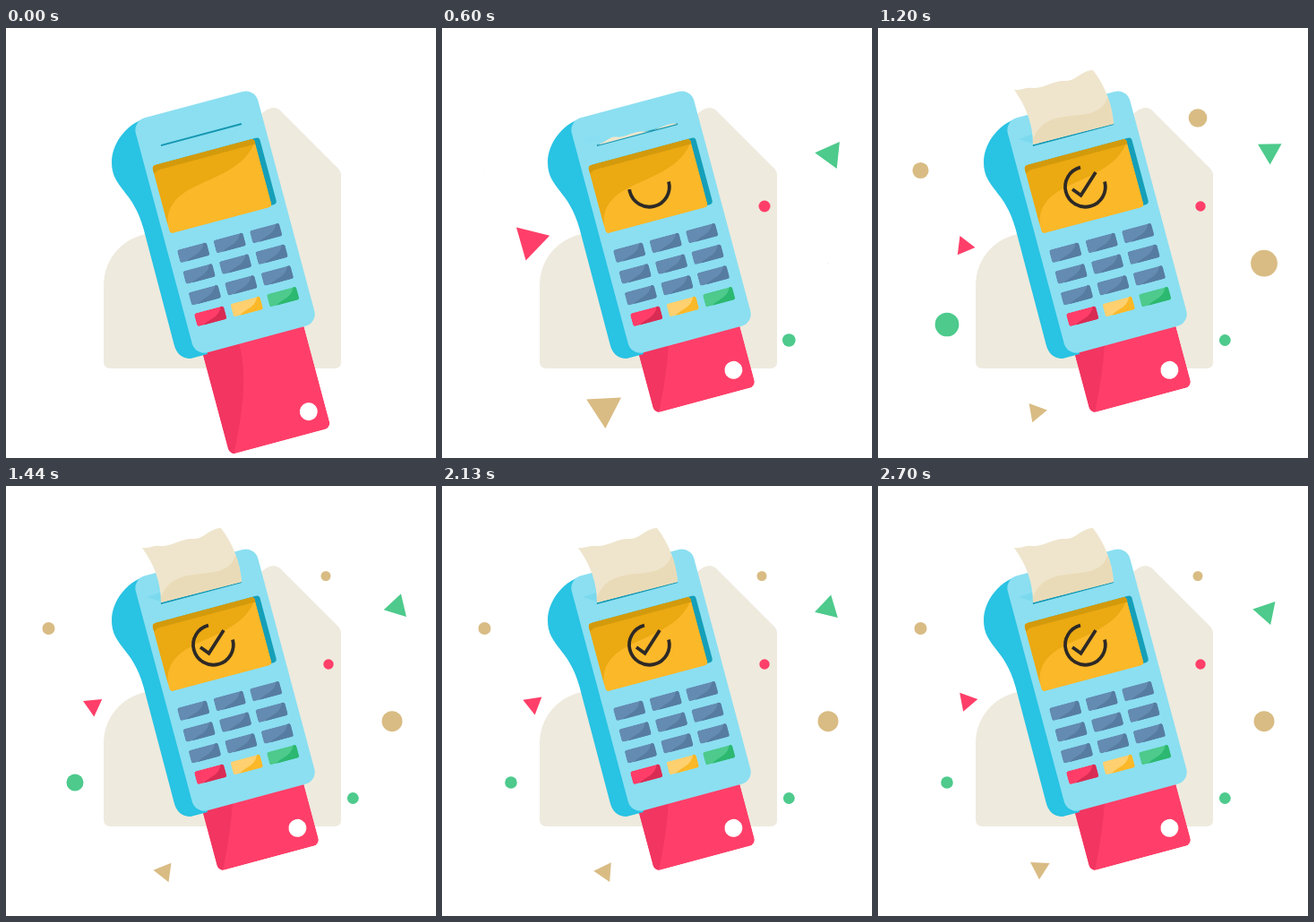
An HTML page with a canvas that plays this animation: 480x480 px, repeating every 2.73 s.

```html
<!DOCTYPE html>
<html lang="en">
<head>
<meta charset="utf-8">
<title>Card payment</title>
<style>
html, body { margin: 0; width: 100%; height: 100%; overflow: hidden; background: #fff; }
canvas { display: block; width: 480px; height: 480px; }
</style>
</head>
<body>
<canvas id="stage" width="480" height="480"></canvas>
<script>
const ctx = document.getElementById('stage').getContext('2d');
const LOOP = 2730, STEP = 30, RAD = Math.PI / 180;
const PINK = '#ff3f69', GREEN = '#4dca8c', TAN = '#d9bc84', INK = '#2d2926';

const clamp = v => Math.max(0, Math.min(1, v));
const progress = (t, from, to) => clamp((t - from) / (to - from));
const smooth = u => u * u * (3 - 2 * u);
const mix = (a, b, u) => a + (b - a) * u;

function fillPath(d, color) {
  ctx.fillStyle = color;
  ctx.fill(new Path2D(d));
}

function roundRect(x, y, w, h, r, color) {
  ctx.beginPath();
  ctx.roundRect(x, y, w, h, r);
  ctx.fillStyle = color;
  ctx.fill();
}

function dot(x, y, r, color) {
  ctx.beginPath();
  ctx.arc(x, y, r, 0, 2 * Math.PI);
  ctx.fillStyle = color;
  ctx.fill();
}

// Draws in the tilted coordinates of the terminal.
function tilted(draw) {
  ctx.save();
  ctx.rotate(-15 * RAD);
  draw();
  ctx.restore();
}

function drawBackdrop() {
  fillPath('M109 372 V287 A58 58 0 0 1 167 229 L284 97 Q299 82 309 95' +
    ' L371 157 Q374 160 374 165 V373 Q374 380 367 380 H117 Q109 380 109 372 Z', '#eeeade');
}

function drawCard(t) {
  const y = -48 * smooth(progress(t, 0, 450));
  tilted(() => {
    ctx.translate(0, y);
    ctx.beginPath();
    ctx.roundRect(118, 370, 117, 155, 7);
    ctx.clip();
    ctx.fillStyle = PINK;
    ctx.fill();
    fillPath('M110 360 H160 V405 C162 445 140 490 123 525 H110 Z', '#f23561');
    dot(215.5, 501, 10, '#fff');
  });
}

function drawKey(x, y, base, shade) {
  ctx.save();
  ctx.translate(x, y);
  ctx.beginPath();
  ctx.roundRect(-17, -7.5, 34, 15, 2.5);
  ctx.clip();
  ctx.fillStyle = base;
  ctx.fill();
  fillPath('M-10 8 C-4 2 9 5 14 -8 H18 V8 Z', shade);
  ctx.restore();
}

function drawTerminal() {
  fillPath('M162 99 C136 104 118 128 118 150 C118 179 142 181 153.5 224' +
    ' L187.5 353 Q191.5 369 206 369 L225 364 Z', '#29c3e3');
  tilted(() => {
    roundRect(109.5, 137, 141.3, 271, 14, '#8bdff1');
    roundRect(133, 170.4, 93.5, 2, 1, '#1597b1');
    roundRect(119, 190.8, 122.5, 77, 4, '#159fb8');

    ctx.save();
    ctx.beginPath();
    ctx.roundRect(117.5, 191, 118, 78.5, 4);
    ctx.clip();
    ctx.fillStyle = '#fbb829';
    ctx.fill();
    fillPath('M117 262 C126 205 203 240 236 194 V190 H117 Z', '#eba912');
    fillPath('M117 190 H236 V197 H123 L117 200 Z', '#d39a0c');
    ctx.restore();

    const bottomRow = [['#ff3d68', '#d92c54'], ['#fed06f', '#fbb829'], ['#4dca8c', '#2cb870']];
    for (let row = 0; row < 4; row++) {
      for (let col = 0; col < 3; col++) {
        const colors = row < 3 ? ['#648bb1', '#577ca1'] : bottomRow[col];
        drawKey(137.1 + 41.9 * col, 296.4 + 24.5 * row, ...colors);
      }
    }
  });
}

function drawStatus(t) {
  ctx.strokeStyle = INK;
  ctx.lineWidth = 3.8;
  const sweep = 271 * smooth(progress(t, 420, 705));
  if (sweep > 0) {
    ctx.beginPath();
    ctx.arc(231.4, 177.3, 22.4, -15 * RAD, (sweep - 15) * RAD);
    ctx.stroke();
  }
  const length = progress(t, 780, 1010) * 42;
  if (length > 0) {
    const first = Math.min(length / 11.5, 1), second = clamp((length - 11.5) / 30.5);
    ctx.beginPath();
    ctx.moveTo(217, 180);
    ctx.lineTo(mix(217, 226.5, first), mix(180, 186.7, first));
    if (second > 0) ctx.lineTo(mix(226.5, 243, second), mix(186.7, 161, second));
    ctx.stroke();
  }
}

// Each pose: bottom left, left bend, top left, two top knots, top right, right bend, bottom right.
const paperPoses = [
  [173, 131, 180, 129, 173, 130, 194, 122, 225, 116, 262, 107, 262, 107, 262, 107],
  [179, 130, 172, 114, 160, 95, 193, 90, 226, 82, 249, 70, 259, 86, 268, 107],
  [173, 130, 173, 98, 152, 69, 172, 67, 209, 59, 240, 47, 260, 73, 263, 107]
];
const shadePoses = [
  [262, 107, 262, 107, 262, 107, 262, 107],
  [238, 116, 254, 108, 262, 101, 258, 85],
  [172, 127, 188, 78, 248, 116, 257, 74]
];

// Uneven torn edge between two knots.
function tornEdge(x0, y0, x1, y1) {
  const reach = (x1 - x0) * 0.35;
  ctx.bezierCurveTo(x0 + reach, y0 + 1, x1 - reach, y1 - 1, x1, y1);
}

function drawPaper(t) {
  if (t <= 570) return;
  const rise = progress(t, 570, 840) ** 2, settle = progress(t, 840, 1110);
  const easeOut = 1 - (1 - settle) ** 2;
  const pose = keys => keys[0].map((v, i) =>
    settle > 0 ? mix(keys[1][i], keys[2][i], easeOut) : mix(v, keys[1][i], rise));
  const p = pose(paperPoses), s = pose(shadePoses);

  ctx.globalAlpha = rise * (1 - 0.7 * easeOut);
  fillPath('M157 124 L174 118 L179 131 Z', '#55cce7');
  ctx.globalAlpha = 1;

  ctx.save();
  ctx.beginPath();
  ctx.moveTo(p[0], p[1]);
  ctx.quadraticCurveTo(...p.slice(2, 6));
  for (let i = 4; i < 10; i += 2) tornEdge(...p.slice(i, i + 4));
  ctx.quadraticCurveTo(...p.slice(12, 16));
  ctx.closePath();
  ctx.fillStyle = '#efe5cd';
  ctx.fill();
  ctx.clip();
  ctx.beginPath();
  ctx.moveTo(s[0], s[1]);
  ctx.bezierCurveTo(...s.slice(2, 8));
  ctx.lineTo(p[14] + 6, p[15]);
  ctx.lineTo(p[0], p[1] + 2);
  ctx.fillStyle = '#eadbb8';
  ctx.fill();
  ctx.restore();
}

const circles = [
  { x: 360, y: 199, r: 5.7, color: PINK, start: 400, peak: 2.2 },
  { x: 387.3, y: 348.5, r: 6.4, color: GREEN, start: 400, peak: 2.2 },
  { x: 47.5, y: 159, r: 7, color: TAN, start: 570, peak: 2.05 },
  { x: 431, y: 262.7, r: 11.5, color: TAN, start: 570, peak: 2.05 },
  { x: 357, y: 100.5, r: 5.5, color: TAN, start: 685, peak: 2.2 },
  { x: 77, y: 331, r: 6.8, color: GREEN, start: 840, peak: 2 }
];

// "turn" is the heading at 600 ms; the shape swings on an off-centre pivot.
const triangles = [
  { x: 434, y: 137.2, r: 15.3, color: GREEN, start: 400, peak: 2.2, turn: 66, orbit: 3.4, lead: 30 },
  { x: 99, y: 243, r: 12.3, color: PINK, start: 300, peak: 2.08, turn: 104, orbit: 2.8, lead: 165 },
  { x: 179.3, y: 429.3, r: 12.5, color: TAN, start: 300, peak: 2.08, turn: 87, orbit: 2.8, lead: 205 }
];

function popScale(t, { start, peak }) {
  const top = start + 390;
  return t < top
    ? peak * smooth(progress(t, start, top))
    : mix(peak, 1, smooth(progress(t, top, top + 370)));
}

function drawConfetti(t) {
  for (const c of circles) {
    const scale = popScale(t, c);
    if (scale > 0) dot(c.x, c.y, c.r * scale, c.color);
  }
  const since = t - 600;
  const spin = -0.1688 * since + 4.5 * Math.sin(2 * Math.PI * since / 2100);
  for (const k of triangles) {
    const scale = popScale(t, k);
    if (scale <= 0) continue;
    const angle = k.turn + spin;
    const cx = k.x + k.orbit * scale * Math.cos((angle + k.lead) * RAD);
    const cy = k.y + k.orbit * scale * Math.sin((angle + k.lead) * RAD);
    ctx.beginPath();
    for (let i = 0; i < 3; i++) {
      const a = (angle + 120 * i) * RAD;
      ctx.lineTo(cx + k.r * scale * Math.cos(a), cy + k.r * scale * Math.sin(a));
    }
    ctx.fillStyle = k.color;
    ctx.fill();
  }
}

function render(now) {
  const t = Math.floor((now % LOOP) / STEP) * STEP;
  ctx.fillStyle = '#fff';
  ctx.fillRect(0, 0, 480, 480);
  drawBackdrop();
  drawCard(t);
  drawTerminal();
  drawStatus(t);
  drawPaper(t);
  drawConfetti(t);
}

const began = performance.now();
function tick() {
  render(performance.now() - began);
  requestAnimationFrame(tick);
}
tick();
</script>
</body>
</html>
```
